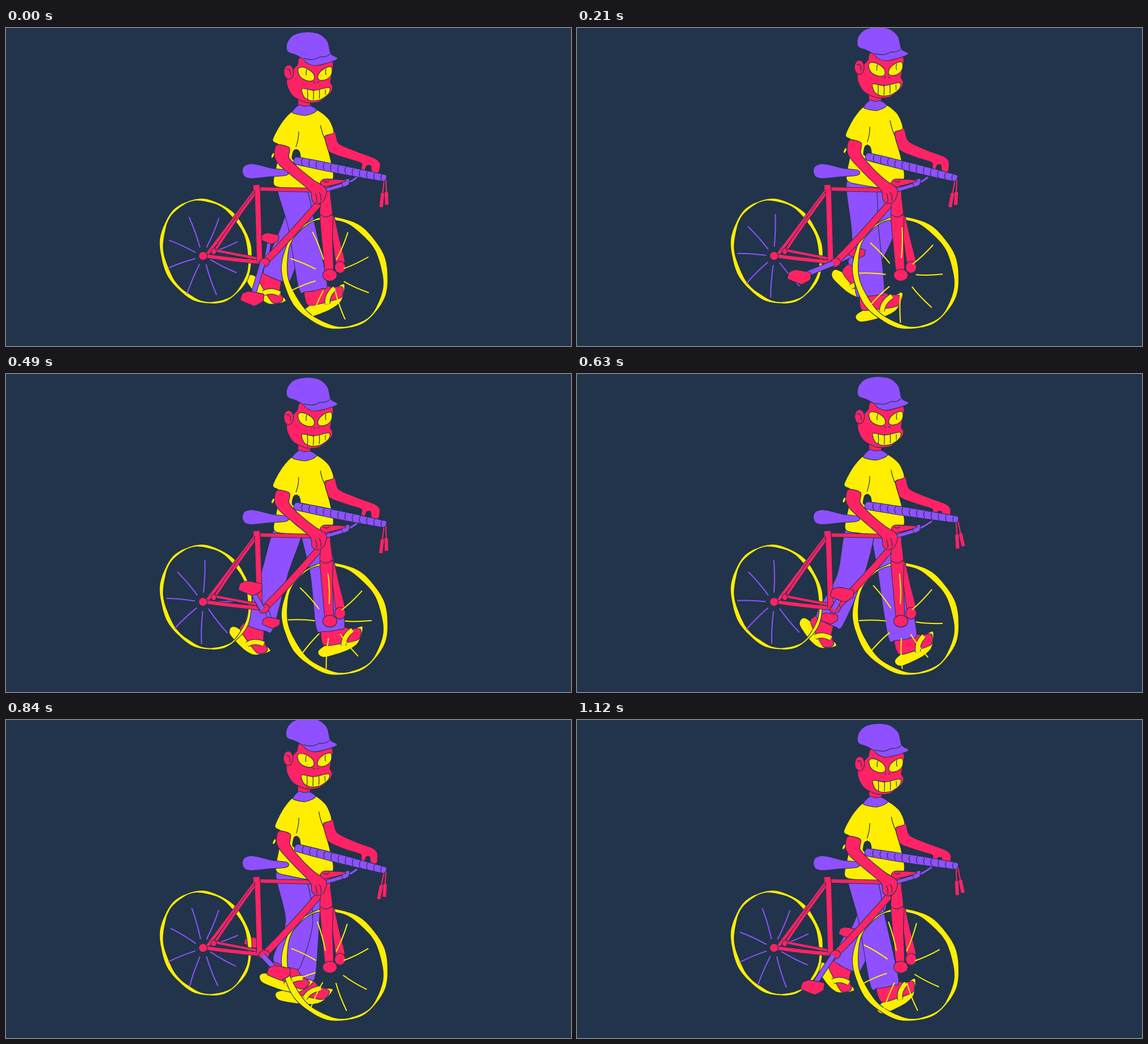
An HTML page with a canvas for the animation above (1.15 s loop, 998 by 561 pixels).

```html
<!DOCTYPE html>
<html lang="en">
<head>
<meta charset="utf-8">
<title>Walking the bike</title>
<style>
html, body { margin: 0; height: 100%; overflow: hidden; background: #21344b; }
canvas { display: block; width: 100vw; height: 100vh; }
</style>
</head>
<body>
<canvas id="stage" width="998" height="561"></canvas>
<script>
const ctx = document.getElementById('stage').getContext('2d');
const INK = '#21344b', PINK = '#ff2366', YELLOW = '#ffee00', PURPLE = '#8f50ff';
const LOOP = 1150, STEP = 70;
const STRIDE = 15; // steps in one full walking cycle
const { sin, cos, PI, hypot, abs, max, min } = Math;

const wave = (step, peak, period = STRIDE) => cos(2 * PI * (step - peak) / period);
const noise = n => { const v = sin(n * 127.1) * 43758.5; return v - Math.floor(v); };
const nums = s => typeof s === 'string' ? s.split(' ').map(Number) : s;

// Maps every x y pair of a flat list.
function mapPoints(p, fn) {
  p = nums(p);
  const out = [];
  for (let i = 0; i < p.length; i += 2) out.push(...fn(p[i], p[i + 1]));
  return out;
}

// Adds a smooth closed curve through flat x y pairs.
function trace(path, p, ease) {
  const n = p.length / 2;
  const pt = i => { i = (i + n) % n; return [p[2 * i], p[2 * i + 1]]; };
  path.moveTo(...pt(0));
  for (let i = 0; i < n; i++) {
    const [a, b, c, d] = [pt(i - 1), pt(i), pt(i + 1), pt(i + 2)];
    path.bezierCurveTo(b[0] + (c[0] - a[0]) * ease, b[1] + (c[1] - a[1]) * ease,
      c[0] - (d[0] - b[0]) * ease, c[1] - (d[1] - b[1]) * ease, c[0], c[1]);
  }
  path.closePath();
}

// The outline lies outside the filled area.
function paint(path, color) {
  ctx.strokeStyle = INK;
  ctx.lineWidth = 2.2;
  ctx.stroke(path);
  ctx.fillStyle = color;
  ctx.fill(path, 'evenodd');
}

function shape(p, color, ease = 0.13) {
  const path = new Path2D();
  trace(path, nums(p), ease);
  paint(path, color);
}

function disc(x, y, rx, ry, color, turn = 0) {
  const path = new Path2D();
  path.ellipse(x, y, rx, ry, turn, 0, 7);
  paint(path, color);
}

function line(p, color = INK, width = 1.2) {
  p = nums(p);
  ctx.beginPath();
  ctx.moveTo(p[0], p[1]);
  if (p.length === 6) ctx.quadraticCurveTo(...p.slice(2));
  else ctx.lineTo(p[2], p[3]);
  ctx.strokeStyle = color;
  ctx.lineWidth = width;
  ctx.stroke();
}

function tube(p, color, width) {
  line(p, INK, width + 2);
  line(p, color, width);
}

// One leg at a point of its stride: heel strike at 0, toe-off near 8.
function leg(stride, hipX, hipWidth, shiftX, shiftY) {
  const x = 495 + 72 * wave(stride, 0.7) + shiftX;
  const y = 473 + 18 * wave(stride, 2.9) + shiftY;
  const tilt = (10 + 40 * wave(stride, 8.6)) * PI / 180;
  const length = 1 - 0.35 * abs(sin(tilt));
  const place = (px, py) => [x + px * length * cos(tilt) - py * sin(tilt),
    y + px * length * sin(tilt) + py * cos(tilt)];

  shape(mapPoints('-47 0 -46 15 0 19 28 14 47 -5 41 -11', place), YELLOW);
  shape(mapPoints('-29 -32 -37 -5 -8 3 32 8 43 -7 22 -15 2 -32', place), PINK);
  tube(mapPoints('0 9 6 -6 28 -11', place), YELLOW, 8);

  const [cx, cy] = place(-10, -33);
  const kx = (hipX + cx) / 2 + 20 * max(0, wave(stride, 11.5)), ky = 354;
  const d = hypot(cx - kx, cy - ky);
  const ux = (cx - kx) / d, uy = (cy - ky) / d;
  const side = w => [cx + uy * w, cy - ux * w];
  shape([hipX - hipWidth, 268, kx - 24, ky, ...side(-25), cx + ux * 9 - uy * 14, cy + uy * 9 + ux * 14,
    cx + ux * 9 + uy * 14, cy + uy * 9 - ux * 14, ...side(25), kx + 23, ky, hipX + hipWidth, 268], PURPLE, 0.15);
}

// The hands hold the bike, so points near the grip stay while the rest rises.
function rise(p, lift) {
  return mapPoints(p, (x, y) => {
    const w = lift * min(1, max(0, (hypot(x - 600, y - 290) - 50) / 70));
    return [x + w * (520 - x) * 0.1, y - w * 12];
  });
}

function torso(lift) {
  shape(rise('560 188 570 217 600 229 628 238 628 248 633 251 637 243 645 243 647 254 658 255 661 240 652 231 620 219 588 205 580 184', lift), PINK);
  line(rise('527 122 527 149', lift), PINK, 21);
  shape(rise('506 149 486 170 471 199 482 208 479 238 473 277 500 283 545 282 577 266 572 228 563 193 579 185 570 162 548 146 527 154', lift), YELLOW);
  shape(rise('506 150 517 138 527 140 538 139 549 146 540 152 527 155', lift), PURPLE);
  shape(rise('506 232 508 219 513 216 518 220 519 232', lift), INK);
  line(rise('517 184 517 198 512 211', lift));
  line(rise('556 173 558 186 564 197', lift));
  disc(471 + 3 * lift, 226 - 12 * lift, 1.8, 4.5, YELLOW, 0.4);
}

function nearArm(lift) {
  shape(rise('478 208 474 227 483 243 510 265 538 288 541 304 549 310 561 304 565 284 542 268 514 246 499 230 500 213', lift), PINK);
  line('546 292 550 298 549 308');
  line('553 290 558 296 556 305');
}

function head(lift) {
  ctx.save();
  ctx.translate(-0.5 - lift, 1 - 12 * lift);
  shape('523 52 516 65 508 74 498 86 498 102 508 120 530 131 553 130 573 115 577 104 573 96 575 84 575 58', PINK);
  disc(500, 78, 8, 12, PINK);
  line('496 74 503 69 503 84');
  shape('498 41 498 26 509 13 530 8 553 11 568 24 574 46 586 54 570 61 547 66 533 62 525 54 512 47', PURPLE, 0.15);
  line('527 54 545 59 555 51');
  line('555 51 566 53 573 46');
  shape('517 74 522 70 533 73 543 81 544 91 534 93 521 86', YELLOW, 0.18);
  shape('552 87 556 78 566 71 575 70 575 82 567 90 556 92', YELLOW, 0.18);
  line('532 73 530 78 531 84');
  line('566 72 564 77 566 83');
  line('544 97 546 98 546 95');
  line('551 95 552 97 554 96');
  shape('524 108 545 111 571 106 570 116 556 126 540 128 528 122', YELLOW);
  for (let x = 533; x < 570; x += 10.5) line([x, 109, x + 1, 118, x, 127 - max(0, x - 550) * 0.6]);
  ctx.restore();
}

// A tilted ring, thicker at its sides than at top and bottom.
function rim(x, y, rx, ry, tilt, thick) {
  const path = new Path2D();
  for (const inner of [0, 1]) {
    const p = [];
    for (let a = 0; a < 2 * PI - 0.01; a += PI / 18) {
      const wobble = 0.7 * sin(a * 9 + inner * 2);
      const u = cos(a) * (rx + wobble - inner * thick), v = sin(a) * (ry + wobble - inner * 2.5);
      p.push(x + u * cos(tilt) - v * sin(tilt), y + u * sin(tilt) + v * cos(tilt));
    }
    trace(path, p, 0.16);
  }
  paint(path, YELLOW);
}

// Eight hand-drawn spokes, turning half a gap with each step.
function spokes(step, x, y, rx, ry, start, color) {
  for (let i = 0; i < 8; i++) {
    const a = (24 + i * 45 + step * 22.5 + 8 * (noise(i + step * 8 + x) - 0.5)) * PI / 180;
    const c = cos(a) * rx, s = sin(a) * ry;
    line([x + c * start, y + s * start, x + c * 0.65 - s * 0.03, y + s * 0.65 + c * 0.03, x + c, y + s], color, 2);
  }
}

function crank(step, side) {
  const a = (4 + step * 24) * PI / 180;
  const near = side > 0;
  const x = near ? 438 - 47 * sin(a) : 464 + 30 * sin(a);
  const y = near ? 427 + 50 * cos(a) : 405 - 34 * cos(a);
  const size = near ? 1 : 0.75;
  tube([near ? 453 : 459, near ? 415 : 413, x, y], PURPLE, near ? 8 : 6);
  shape(mapPoints('-20 3 -17 -8 -6 -12 20 -7 19 5 4 13', (px, py) => [x + px * size, y + py * size]), PINK, 0.04);
}

function handlebar(step, lift) {
  const kick = Math.exp(-(((step % (STRIDE / 2)) - 1.3) ** 2) / 0.4); // jolt after each heel strike
  const x0 = 512 + 2 * lift, y0 = 235 - 10 * lift;
  const x1 = 667 + 2 * kick, y1 = 265 - 9 * kick;
  const len = hypot(x1 - x0, y1 - y0);
  tube([605, 272, 612, 270, 620 + 8 * kick, 263 - 4 * kick], PURPLE, 3);

  const sway = 10 * kick - 5 * lift;
  for (const i of [0, 1]) {
    const x = x1 + 1 + 3 * i, y = y1 + 2;
    const ex = x1 - 4 + 10 * i + sway, ey = y1 + 51 - 4 * i;
    line([x, y, ex, ey], PINK, 2);
    line([(x + ex) / 2, (y + ey) / 2, ex, ey], PINK, 6);
  }

  ctx.save();
  ctx.translate(x0, y0);
  ctx.rotate(Math.atan2(y1 - y0, x1 - x0));
  shape([0, -6, len / 2, -7, len, -6, len + 4, -3, len, 5, len / 2, 7, 0, 6], PURPLE, 0.06);
  for (let x = 11; x < len; x += 13) line([x, -6, x - 3, 0, x + 2, 6]);
  ctx.restore();
}

function seat() {
  shape('418 253 421 244 432 240 446 242 470 248 495 251 499 256 492 260 465 262 434 265 422 262', PURPLE);
}

function frame() {
  tube('354 401 442 284', PINK, 5);
  tube('370 391 400 345 441 290', PINK, 4);
  tube('368 392 446 407', PINK, 4);
  tube('352 402 400 409 450 413', PINK, 6);
  disc(367, 394, 4, 5, PINK);
  disc(348, 402, 7, 7, PINK);
  tube('448 284 500 285 545 286', PINK, 6);
  tube('552 310 504 366 457 413', PINK, 11);
  tube('444 283 448 412', PINK, 9);
  tube('442 277 443 286', PINK, 11);
  disc(456, 414, 9, 7, PINK, -0.3);
}

function fork() {
  shape('570 328 579 332 589 375 598 412 584 418 577 370', PINK, 0.08);
  disc(590, 422, 9, 10, PINK);
  shape('555 330 566 334 577 331 576 370 578 434 565 436 559 380', PINK, 0.08);
  disc(572, 436, 12, 10, PINK);
  shape('556 272 571 274 573 300 576 327 566 333 555 328 557 300', PINK, 0.08);
  shape('566 283 592 275 606 267 604 277 588 282 567 288', PURPLE, 0.06);
  shape('593 270 606 266 605 276 596 280', PURPLE, 0.05);
  shape('556 272 562 267 590 268 600 270 580 276 558 280', PINK, 0.1);
  line('560 270 568 274 571 269');
}

function draw(now) {
  const step = Math.floor(now % LOOP / STEP);
  const lift = 0.54 - 0.44 * wave(step, 0.3, STRIDE / 2);
  ctx.fillStyle = INK;
  ctx.fillRect(0, 0, 998, 561);

  leg(step + STRIDE / 2, 539, 18, 35, -5);
  leg(step, 501, 23, 0, 0);
  torso(lift);
  head(lift);

  crank(step, -1);
  seat();
  rim(353, 394, 79, 94, -0.35, 6);
  spokes(step, 348, 402, 65, 74, 0.22, PURPLE);
  rim(581, 432, 91, 101, -0.5, 10);
  frame();
  handlebar(step, lift);
  fork();
  spokes(step, 572, 436, 74, 84, 0.36, YELLOW);
  crank(step, 1);
  nearArm(lift);
}

const start = performance.now();
function tick() {
  draw(performance.now() - start);
  requestAnimationFrame(tick);
}
tick();
</script>
</body>
</html>
```
